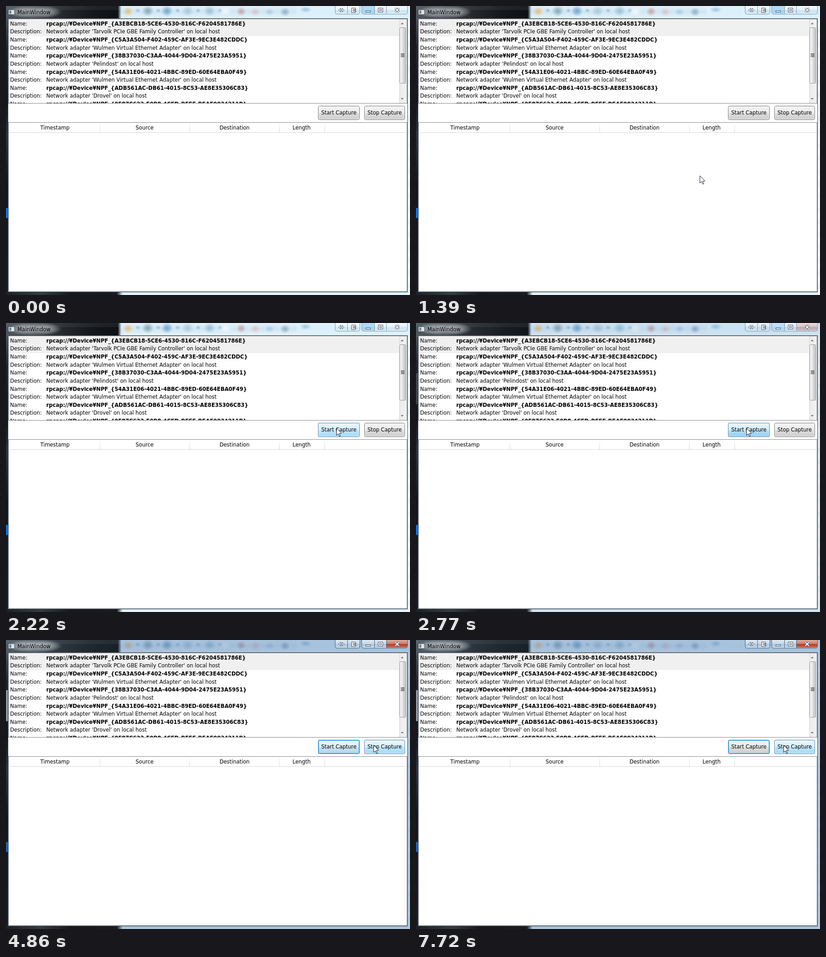
An HTML page with a canvas for the animation above (8000 ms loop, 883 px wide and 634 px high).

```html
<!DOCTYPE html>
<html lang="en">
<head>
<meta charset="utf-8">
<title>Packet capture</title>
<style>
html, body { margin: 0; width: 100%; height: 100%; overflow: hidden; }
canvas { display: block; }
</style>
</head>
<body>
<canvas id="stage" width="883" height="634"></canvas>
<script>
const ctx = document.getElementById('stage').getContext('2d');
const LOOP = 8000, STEP = 78, FIRST_STEP = 432;
const FAMILY = '"DejaVu Sans", sans-serif';

const adapters = [
  ['A3EBCB18-5CE6-4530-816C-F6204581786E', 'Tarvolk PCIe GBE Family Controller'],
  ['C5A3A504-F402-459C-AF3E-9EC3E482CDDC', 'Wulmen Virtual Ethernet Adapter'],
  ['38B37030-C3AA-4044-9D04-2475E23A5951', 'Pelindost'],
  ['54A31E06-4021-4BBC-89ED-60E64EBA0F49', 'Wulmen Virtual Ethernet Adapter'],
  ['ADB561AC-DB61-4015-8C53-AE8E35306C83', 'Drovel'],
  ['0E87C623-F0B8-4CFD-BFFE-BEAF0034211B', '']
];

// Pointer path: [step, x, y]
const path = [
  [0, 150, 53], [4, 205, 270], [7, 266, 361], [10, 420, 385], [12, 620, 372],
  [16, 760, 250], [18, 745, 200], [21, 722, 230], [48, 722, 230],
  [51, 800, 230], [53, 866, 230], [56, 803, 230]
];

const skins = {
  normal: ['#707070', '#f3f3f3', '#ebebeb', '#dddddd', '#cdcdcd'],
  hover: ['#3c7fb1', '#eaf6fd', '#d9f0fc', '#bee6fd', '#a7d9f5'],
  pressed: ['#2c628b', '#e5f4fc', '#c4e5f6', '#98d1ef', '#68b3db']
};

const ramp = (t, from, to) => Math.min(1, Math.max(0, (t - from) / (to - from)));

function rect(x, y, w, h, fill) {
  ctx.fillStyle = fill;
  ctx.fillRect(x, y, w, h);
}

function frame(x, y, w, h, stroke) {
  ctx.strokeStyle = stroke;
  ctx.strokeRect(x + .5, y + .5, w - 1, h - 1);
}

function gradient(x0, y0, x1, y1, stops) {
  const g = ctx.createLinearGradient(x0, y0, x1, y1);
  stops.forEach(([at, color]) => g.addColorStop(at, color));
  return g;
}

function round(x, y, w, h, r, fill, stroke) {
  ctx.beginPath();
  ctx.roundRect(x, y, w, h, r);
  if (fill) { ctx.fillStyle = fill; ctx.fill(); }
  if (stroke) { ctx.strokeStyle = stroke; ctx.stroke(); }
}

function polygon(points, fill, stroke) {
  ctx.beginPath();
  points.forEach(([x, y]) => ctx.lineTo(x, y));
  ctx.closePath();
  if (fill) { ctx.fillStyle = fill; ctx.fill(); }
  if (stroke) { ctx.strokeStyle = stroke; ctx.stroke(); }
}

function text(s, x, y, align = 'left', bold = false) {
  ctx.font = (bold ? 'bold 11.52px ' : '11.45px ') + FAMILY;
  ctx.textAlign = align;
  ctx.fillStyle = '#000';
  ctx.fillText(s, x, Math.round(y));
}

function blob(x, y, rx, ry, rgb, alpha) {
  ctx.save();
  ctx.translate(x, y);
  ctx.scale(rx, ry);
  const g = ctx.createRadialGradient(0, 0, 0, 0, 0, 1);
  g.addColorStop(0, `rgba(${rgb},${alpha})`);
  g.addColorStop(.45, `rgba(${rgb},${alpha * .6})`);
  g.addColorStop(1, `rgba(${rgb},0)`);
  rect(-1, -1, 2, 2, g);
  ctx.restore();
}

function glass(active) {
  rect(0, 0, 883, 634, '#dff1fa');
  rect(240, 0, 643, 28, gradient(0, 0, 0, 28, [[0, '#e3f1f9'], [.45, '#cfe6f3'], [1, '#e8f5fb']]));
  rect(635, 0, 248, 28, 'rgba(222,243,253,.8)');
  for (let y = 40; y < 630; y += 28) blob(881, y, 4, 14, '255,255,255', .6);
  blob(267, 12, 11, 10, '240,180,90', .8);
  [[310, '85,125,140'], [352, '50,120,180'], [397, '120,160,185'], [445, '85,145,180']]
    .forEach(([x, rgb], i) => {
      blob(x, 11, 13, 12, rgb, i < 2 ? .6 : .45);
      blob(x + 23, 10, 6, 5, '90,135,180', .45);
    });
  blob(288, 10, 6, 5, '90,135,180', .45);
  blob(479, 12, 14, 11, '248,252,255', .8);
  blob(514, 12, 11, 10, '190,110,110', .55);
  blob(545, 13, 11, 9, '225,175,170', .65);
  blob(576, 13, 11, 8, '140,175,210', .5);
  blob(610, 13, 11, 10, '95,130,160', .55);
  blob(655, 8, 13, 7, '105,155,195', .5);
  rect(0, 0, 883, 634, `rgba(85,125,175,${.4 * active})`);

  // Dark desktop showing through the left part
  rect(0, 0, 252, 28, gradient(0, 0, 252, 0, [
    [0, '#4c565e'], [.2, '#43494e'], [.5, '#24282d'], [.75, '#14181c'], [.97, '#0d1115'], [1, 'rgba(13,17,21,0)']]));
  rect(0, 0, 248, 9, 'rgba(190,205,215,.08)');
  rect(0, 28, 5, 606, gradient(0, 28, 0, 634, [
    [0, '#4b545c'], [.1, '#20262c'], [.3, '#11161b'], [.42, '#29343e'], [.6, '#10151b'], [1, '#171d23']]));
  rect(0, 627, 255, 7, gradient(0, 0, 255, 0, [
    [0, '#1a2026'], [.3, '#343c42'], [.55, '#14191e'], [.95, '#171c20'], [1, 'rgba(23,28,32,0)']]));
  rect(0, 443, 4, 22, active > .5 ? '#1c65b5' : '#0878ed');
  rect(0, 0, 250, 28, `rgba(95,125,155,${.14 * active})`);
  rect(0, 110, 4, 68, `rgba(185,203,218,${.7 * active})`);

  blob(63, 13, 60, 15, '205,211,216', .75 + active * .12);
  blob(35, 13, 32, 13, '205,211,216', .4);
  blob(90, 13, 30, 13, '205,211,216', .4);
}

function captionButtons(active) {
  const edge = active > .5 ? '#4d6276' : '#8298aa';
  const pale = gradient(0, 0, 0, 18, [[0, 'rgba(255,255,255,.65)'], [.48, 'rgba(235,245,252,.4)'],
    [.5, 'rgba(175,203,224,.3)'], [1, 'rgba(225,241,250,.6)']]);
  round(719.5, -3, 54, 21, 4, pale, edge);
  round(777.5, -3, 100, 21, 4, pale, edge);
  ctx.globalAlpha = 1 - active;
  rect(778, 0, 27, 17, 'rgba(145,205,248,.65)');
  ctx.globalAlpha = active;
  round(832, -3, 45, 20, [0, 0, 4, 0], gradient(0, 0, 0, 18,
    [[0, '#e3aaa0'], [.48, '#cc7767'], [.5, '#ad3825'], [1, '#d17a59']]));
  ctx.globalAlpha = 1;
  [746, 805, 831].forEach(x => rect(x, 0, 1, 17, edge));
  const ink = '#465260';
  polygon([[731.5, 5], [731.5, 13], [727, 9]], '#fff', ink);
  polygon([[734.5, 5], [734.5, 13], [739, 9]], '#fff', ink);
  rect(755, 4, 9, 11, '#fff');
  frame(755, 4, 9, 11, ink);
  rect(758, 7, 8, 1, ink);
  rect(758, 9, 5, 1, ink);
  rect(758, 11, 8, 1, ink);
  rect(786, 10, 11, 4, '#fff');
  frame(786, 10, 11, 4, ink);
  rect(813, 4, 11, 10, '#fff');
  frame(813, 4, 11, 10, ink);
  frame(816, 7, 5, 4, ink);
  for (const [width, color] of [[4, ink], [2, '#fff']]) {
    ctx.lineWidth = width;
    ctx.strokeStyle = color;
    ctx.beginPath();
    ctx.moveTo(851, 5); ctx.lineTo(859, 13);
    ctx.moveTo(859, 5); ctx.lineTo(851, 13);
    ctx.stroke();
  }
  ctx.lineWidth = 1;
}

function titleBar(active) {
  rect(5, 8, 14, 11, '#f7f9fa');
  frame(5, 8, 14, 11, '#59636c');
  rect(7, 10, 5, 7, '#7b8994');
  rect(14, 10, 3, 7, '#d3dade');
  text('MainWindow', 25, 18);
  captionButtons(active);
}

function adapterList() {
  frame(5, 28, 872, 186, '#828790');
  ctx.save();
  ctx.beginPath();
  ctx.rect(6, 29, 870, 184);
  ctx.clip();
  rect(7, 30, 852, 36, '#f0f0f0');
  adapters.forEach(([id, device], i) => {
    const y = 42.6 + i * 35.3;
    text('Name:', 9, y);
    text(`rpcap://¥Device¥NPF_{${id}}`, 88, y, 'left', true);
    text('Description:', 9, y + 17.65);
    text(`Network adapter '${device}' on local host`, 88, y + 17.65);
  });
  ctx.restore();
  rect(859, 29, 17, 184, gradient(859, 0, 876, 0, [[0, '#e3e3e3'], [.3, '#eeeeee'], [1, '#f0f0f0']]));
  round(860.5, 47.5, 13, 122, 2, gradient(860, 0, 874, 0,
    [[0, '#f5f5f5'], [.48, '#e9e9eb'], [.52, '#d9dadc'], [1, '#c5c6c9']]), '#979797');
  for (let y = 104; y < 113; y += 3) rect(863, y, 8, 2, '#6c6c6c');
  polygon([[863, 40], [869, 40], [866, 36.5]], '#6a7078');
  polygon([[863, 202], [869, 202], [866, 205.5]], '#6a7078');
}

function packetList(hot) {
  frame(5, 255, 872, 372, hot ? '#5289a8' : '#828790');
  rect(8, 277, 866, 1, '#d5d5d5');
  [205, 401, 597, 696].forEach(x => rect(x, 258, 1, 19,
    gradient(0, 258, 0, 277, [[0, '#f2f2f2'], [.6, '#dedede'], [1, '#d2d2d2']])));
  [['Timestamp', 107], ['Source', 303], ['Destination', 499.5], ['Length', 646]]
    .forEach(([label, x]) => text(label, x, 271, 'center'));
}

function buttonSkin(x, w, name, alpha) {
  const [edge, a, b, c, d] = skins[name];
  ctx.globalAlpha = alpha;
  round(x + .5, 219.5, w - 1, 30, 3,
    gradient(0, 220, 0, 250, [[0, a], [.5, b], [.5, c], [1, d]]), edge);
  round(x + 1.5, 220.5, w - 3, 28, 2, null, 'rgba(255,255,255,.75)');
  ctx.globalAlpha = 1;
}

function button(label, x, w, { hover, pressed = 0, focused = false }) {
  buttonSkin(x, w, 'normal', 1);
  if (hover) buttonSkin(x, w, 'hover', hover);
  if (pressed) buttonSkin(x, w, 'pressed', pressed);
  if (focused) {
    round(x + .5, 219.5, w - 1, 30, 3, null, '#3c7fb1');
    round(x + 1.5, 220.5, w - 3, 28, 2, null, '#25c0ea');
  }
  text(label, x + w / 2, 238, 'center');
}

function pointerAt(step) {
  let i = 1;
  while (i < path.length - 1 && path[i][0] < step) i++;
  const [s0, x0, y0] = path[i - 1], [s1, x1, y1] = path[i];
  const k = ramp(step, s0, s1);
  return [Math.round(x0 + (x1 - x0) * k), Math.round(y0 + (y1 - y0) * k)];
}

function pointer(x, y) {
  polygon([[0, 0], [0, 16], [3.7, 12.6], [6.2, 18.4], [8.5, 17.4], [6, 11.7], [11, 11.5]]
    .map(([dx, dy]) => [x + .5 + dx, y + .5 + dy]), '#fff', '#1c1c2b');
}

// Glow of the default button once the pointer has left it
function pulse(t) {
  if (t < 6100) return .65;
  if (t < 6330) return .2;
  if (t < 7270) return .7;
  return t < 7720 ? .35 : 0;
}

function draw(t) {
  const step = Math.floor((t - FIRST_STEP) / STEP);
  const [px, py] = pointerAt(step);
  const active = t < 2770 ? 0 : ramp(t, 2700, 2920);
  const startHover = t < 4300 ? ramp(t, 2130, 2220) : pulse(t);
  const pressed = t < 3470 ? ramp(t, 2740, 2850) : 1 - ramp(t, 3440, 3560);
  const stopHover = t > 4300 && px >= 783 ? ramp(t, 4400, 4750) : 0;

  glass(active);
  titleBar(active);
  rect(4, 27, 874, 601, '#4c5359');
  rect(5, 28, 872, 599, '#fff');
  adapterList();
  packetList(step >= 4 && step <= 10);
  button('Start Capture', 682, 91, { hover: startHover, pressed, focused: t >= 3470 });
  button('Stop Capture', 783, 89, { hover: stopHover });
  if (step >= 0) pointer(px, py);
}

function tick() {
  draw(performance.now() % LOOP);
  requestAnimationFrame(tick);
}
tick();
</script>
</body>
</html>
```
